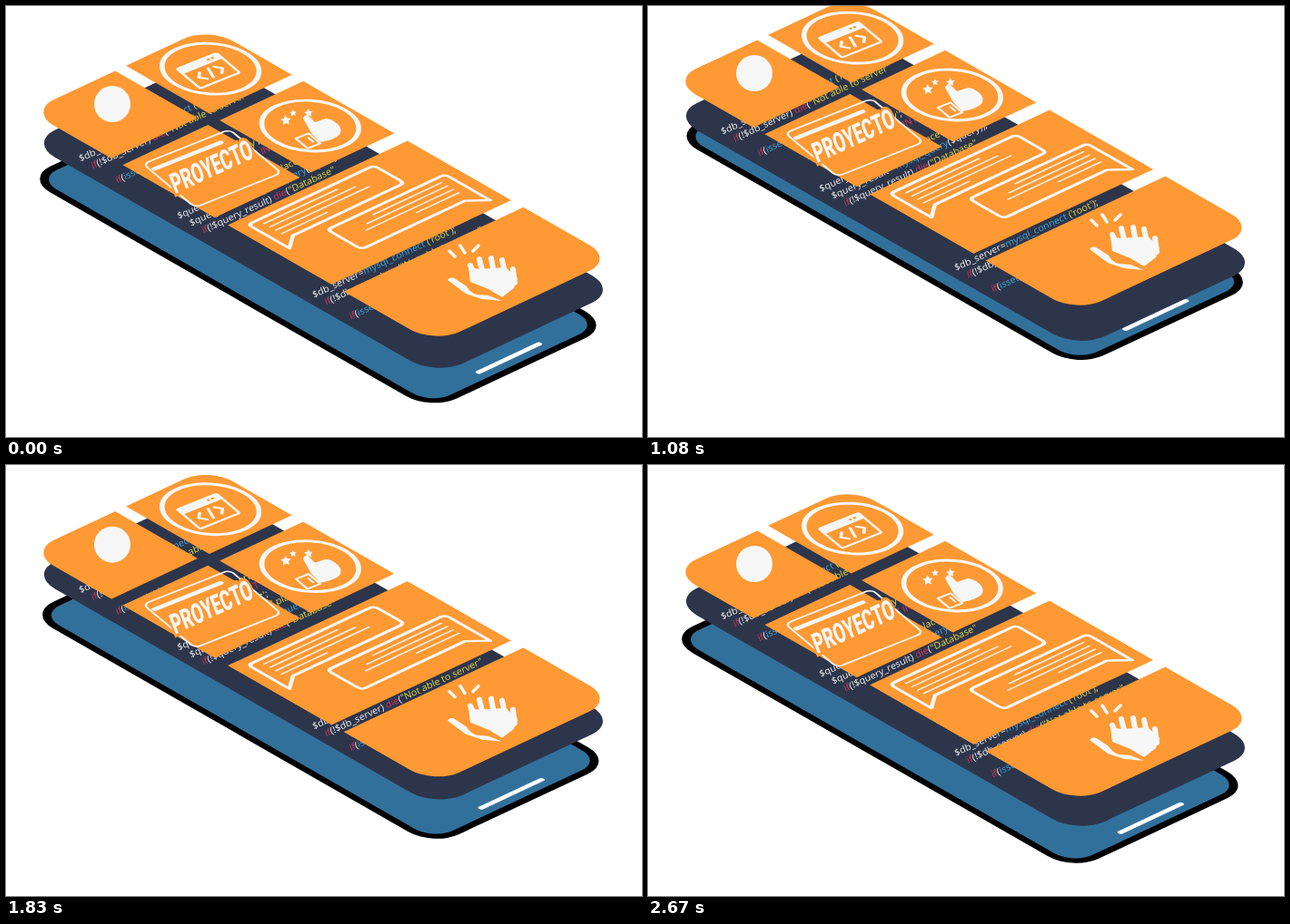
Animation, 700 px wide and 475 px high, one loop 2.7 s. Source, as an HTML page:

```html
<!DOCTYPE html>
<html lang="es">
<head>
<meta charset="utf-8">
<style>
html, body { margin: 0; width: 100%; height: 100%; overflow: hidden; background: #fff; }
svg { display: block; width: 700px; height: 475px; }
.code { font: 10.8px "Open Sans", "Noto Sans", sans-serif; white-space: pre; }
.title { font: 900 31px Roboto, "Open Sans", sans-serif; fill: #f7f7f7; stroke: #ff9933; stroke-width: 7; paint-order: stroke; }
.line { fill: none; stroke: #f7f7f7; stroke-linecap: round; stroke-linejoin: round; }
.solid { fill: #f7f7f7; }
.tile { fill: #ff9933; }
</style>
</head>
<body>
<svg viewBox="0 0 700 475">
  <defs>
    <clipPath id="shape"><rect width="200" height="450" rx="28"/></clipPath>
  </defs>

  <g id="phone"><g class="plane" data-at="21 190">
    <rect width="200" height="450" rx="28"/>
    <rect x="7" y="7" width="186" height="436" rx="21" fill="#32709c"/>
    <path d="M70 433 H137" stroke="#fff" stroke-width="4.8" stroke-linecap="round"/>
  </g></g>

  <g id="code"><g class="plane" data-at="27 151.5">
    <rect x="-1" y="-1" width="202" height="452" rx="29" fill="#2d354b"/>
  </g></g>

  <g id="tiles">
    <g class="plane" data-at="25 116">
      <g id="cards" clip-path="url(#shape)"></g>
      <g id="chat" class="line" stroke-width="3.2"></g>
    </g>

    <circle class="solid" cx="117" cy="108" r="20"/>

    <g class="icon" data-at="186 69">
      <rect class="solid" width="46" height="36" rx="3"/>
      <rect class="tile" x="2.5" y="10" width="41" height="23.5"/>
      <path d="M33 5 h9" stroke="#ff9933" stroke-width="3" stroke-linecap="round" stroke-dasharray="0 4.5"/>
      <path class="line" stroke-width="2.8" d="M15 16 l-5 5.500 l5 5.500 M25 15 l-4 13 M31 16 l5 5.500 l-5 5.500"/>
    </g>

    <g transform="translate(0 3)">
      <path class="solid" d="M327 121 Q330 114 335 120 L340 125 L352 121 Q358 121 365 127 Q371 133 367 139 Q362 144 346 147 L336 137Z"/>
      <g class="icon" data-at="319 143">
        <rect class="line" stroke-width="2.2" width="14" height="17"/>
        <path class="line" stroke-width="2" d="M10 5 v7"/>
      </g>
      <g id="hearts" class="solid"></g>
    </g>

    <g class="icon" data-at="151 174">
      <rect class="line" stroke-width="2" width="95" height="75" rx="6"/>
      <path class="line" stroke-width="5" stroke-linecap="butt" d="M4 11 H77"/>
    </g>
    <text class="title" transform="matrix(.555 -.255 .36 .93 186 207)">PROYECTO</text>

    <path class="line" stroke-width="3.500" d="M488 270 l6 6 M500 264 l5 8 M520 264 l-6 6"/>
    <path class="solid" d="M486 302 Q489 297 495 301 L507 309 Q511 316 518 318 L531 319 L546 325 L524 323 L506 317Z"/>
    <path class="line" stroke-width="6" d="M511 286 l7 14 M521 279 l4 16 M534 278 l3 16 M546 280 l3 14 M558 290 l2 15"/>
    <path class="solid" d="M509 288 L521 290 L550 288 L563 300 L559 311 L546 321 L531 312 L511 304Z"/>
  </g>
</svg>
<script>
const LOOP = 2700, STEP = 30;
const $ = id => document.getElementById(id);

function add(parent, tag, attrs, text) {
  const el = document.createElementNS('http://www.w3.org/2000/svg', tag);
  for (const k in attrs) el.setAttribute(k, attrs[k]);
  if (text) el.textContent = text;
  parent.appendChild(el);
  return el;
}

// Lay each sheet and icon in its slanted plane
function slant(name, axes) {
  for (const el of document.querySelectorAll('.' + name)) {
    el.setAttribute('transform', `matrix(${axes} ${el.dataset.at})`);
  }
}
slant('plane', '.99 -.465 .993 .569');
slant('icon', '1 -.4 .76 .64');

function card(x, y, right, bottom) {
  add($('cards'), 'rect', { x, y, width: right - x, height: bottom - y, class: 'tile' });
}
card(0, 0, 96, 91.5);
card(108, 0, 200, 92.5);
card(0, 104, 95, 206);
card(107, 105, 200, 206);
card(0, 220.5, 200, 335.5);
card(0, 349, 200, 450);

const ring = (cx, cy) => add($('chat'), 'circle', { cx, cy, r: 38, 'stroke-width': 4 });
ring(156.5, 45.500);
ring(156.5, 156);

// Speech bubble with its tail on one side and lines of text
function bubble(x, y, w, h, side) {
  const start = side < 0 ? x : x + w;
  const far = start - side * w;
  const k = side * 5;
  add($('chat'), 'path', {
    d: `M${start} ${y + 5} Q${start} ${y} ${start - k} ${y} H${far + k} Q${far} ${y} ${far} ${y + 5}
        V${y + h - 5} Q${far} ${y + h} ${far + k} ${y + h} H${start - side * 16} L${start} ${y + h + 12}Z`
  });
  [.58, .68, .74, .36].forEach((len, i) => add($('chat'), 'path', {
    'stroke-width': 1.5,
    d: `M${start - side * 11} ${y + 7 + i * 6.5} h${-side * len * w}`
  }));
}
bubble(13, 230, 140, 34, -1);
bubble(56, 275, 131, 38, 1);

function star(x, y, r) {
  let d = '';
  for (let i = 0; i < 10; i++) {
    const a = i * Math.PI / 5 - .4, k = i % 2 ? r * .5 : r;
    d += (i ? 'L' : 'M') + (x + k * Math.cos(a)) + ' ' + (y + k * Math.sin(a));
  }
  add($('hearts'), 'path', { d: d + 'Z' });
}
star(308, 123, 6);
star(316, 115, 4);
star(333, 115, 5);

const INK = { w: '#f4f4f4', b: '#3fa9dc', y: '#e6dc3c', r: '#d8365f' };
// Row, then pieces marked with their ink; deep rows are indented
const head = [
  [0, 'w$db_server=', 'bmysql_connect ', "y('root')", 'w;'],
  [1, 'rif', 'w(!$db_server) ', 'rdie', 'w(', 'y"Not able to server"'],
  [3, 'rif', 'w(', 'bisset', 'w($title))']
];
const tail = [
  [5, 'w$title=', "y'property'", 'w;'],
  [6, 'w$sql=', 'y"', 'rINSERT INTO', 'y"'],
  [7, 'w$user=', "y'root'", 'w;'],
  [8, 'w$query=', 'bstr_replace', 'w(', "y'old place'", 'w);'],
  [9, 'w$query_result= ', 'bmysql_query', 'w($query));'],
  [10, 'rif', 'w(!$query_result) ', 'rdie', 'w(', 'y"Database"']
];

function write(lines, first) {
  for (const [row, ...parts] of lines) {
    const k = row + first;
    const el = add($('code'), 'text', {
      class: 'code',
      x: row > 4 && row < 8 ? 62 : 0,
      transform: `matrix(.9 -.42 .36 .88 ${82 + 13.53 * k} ${173 + 7.9 * k})`
    });
    for (const p of parts) add(el, 'tspan', { fill: INK[p[0]] }, p.slice(1));
  }
}
write(head.concat(tail), 0);
write(head, 19);

// Linear swing between a low point at time `dip` and a high point at time `peak`
function swing(t, peak, high, dip, low) {
  const rise = (peak - dip + LOOP) % LOOP;
  const since = (t - dip + LOOP) % LOOP;
  const k = since < rise ? since / rise : (LOOP - since) / (LOOP - rise);
  return low + (high - low) * k;
}

function move(id, x, y) {
  $(id).setAttribute('transform', `translate(${x} ${y})`);
}

function draw(now) {
  const t = Math.floor(now % LOOP / STEP) * STEP;
  const y = swing(t, 2670, 1, 1110, -49);
  move('phone', -y * .11, y);
  move('code', 0, swing(t, 90, 2, 1470, -44));
  move('tiles', 0, swing(t, 2670, 1, 1176, -37));
}

const begin = performance.now();
function tick() {
  draw(performance.now() - begin);
  requestAnimationFrame(tick);
}
tick();
</script>
</body>
</html>
```
